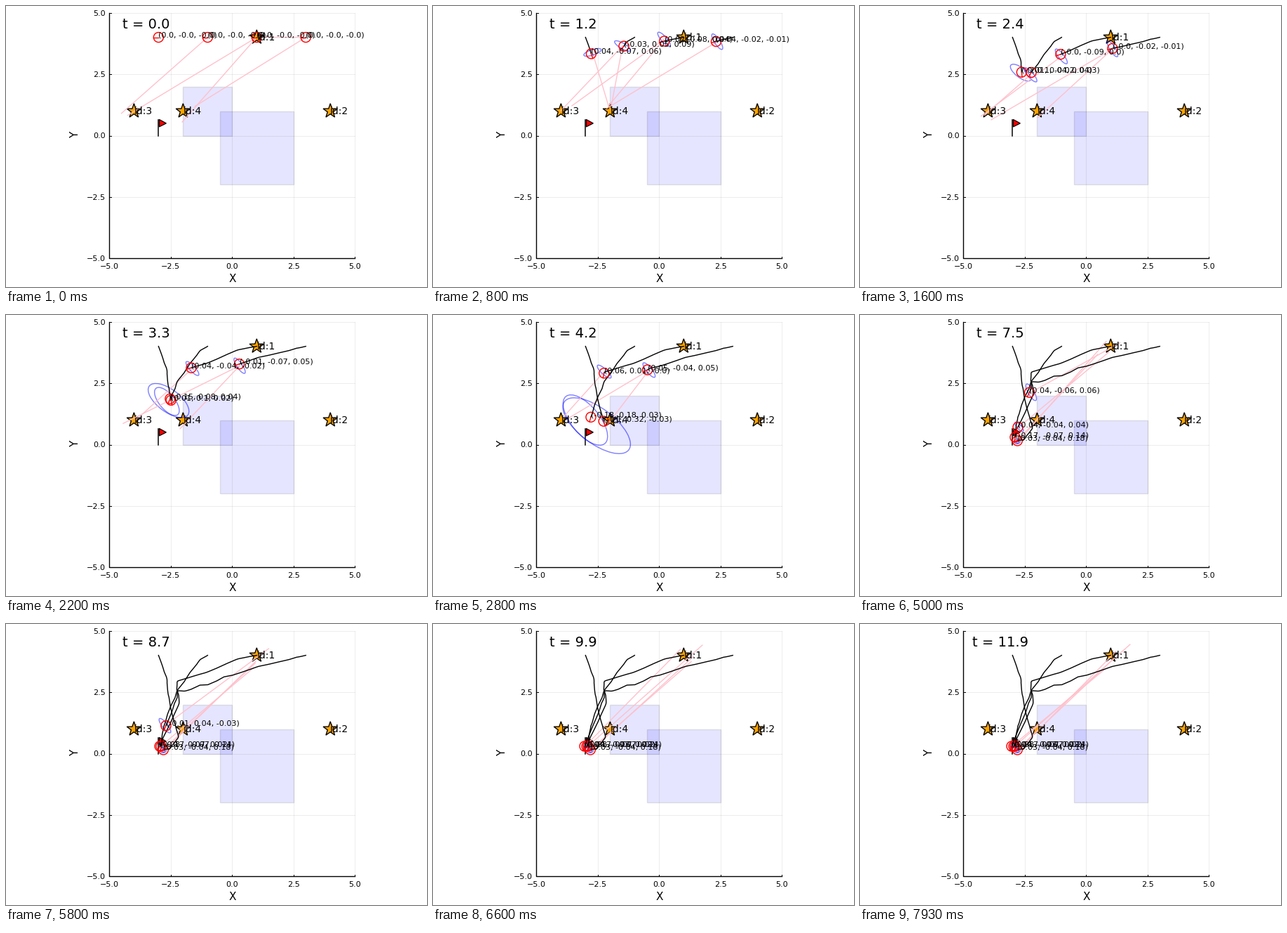
Animation of 600x400 px, one loop 8 s. Source, as a matplotlib script:

```python
import numpy as np
import matplotlib.pyplot as plt
from matplotlib.animation import FuncAnimation
from matplotlib.patches import Circle, Ellipse, Polygon, Rectangle

STEPS = 120
W, H, DPI = 600, 400, 100
UNIT = 34.98
PX = 72 / DPI              # one pixel in points
FOV = np.radians(47)       # half angle of the forward view
REAR = np.radians(130)     # beyond this a star is seen looking back
LOOK_BACK = 45             # step from which robots look back
NEAR, FAR = 2.2 * UNIT, 6.3 * UNIT


def X(x):
    return 322.3 + UNIT * x


def Y(y):
    return 184.5 - UNIT * y


STARS = np.array([(X(x), Y(y)) for x, y in ((1, 4), (4, 1), (-4, 1), (-2, 1))])
GOAL = np.array([X(-3), Y(0)])

# Per robot: key points (step, x, y) and the pose error it ends with
ROBOTS = [
    ([(0, X(-3), Y(4)), (18, 230, 79), (27, 230.5, 101), (42, 243, 152),
      (47, 246, 161), (59, 234, 177), (66, 224.3, 179)], (.03, -.04, .18)),
    ([(0, X(-1), Y(4)), (10, 276, 51.5), (24, 245, 94), (42, 224.5, 146),
      (57, 221, 174)], (-.17, -.07, .14)),
    ([(0, X(1), Y(4)), (12, 330, 49.5), (24, 286, 69), (41, 243.7, 81.2),
      (59, 246.7, 113), (75, 225, 160), (86, 219, 174)], (.08, -.07, .02)),
    ([(0, X(3), Y(4)), (10, 411, 48.3), (24, 360, 60.5), (59, 254, 95.3),
      (65, 244.5, 95), (75, 241.8, 110), (97, 216, 174)], (.04, -.03, .02)),
]

rng = np.random.default_rng(7)


def drive(keys):
    """Positions along the key points with a slight sway, and headings."""
    s, x, y = np.array(keys, float).T
    k = np.arange(STEPS)
    pos = np.stack([np.interp(k, s, x), np.interp(k, s, y)], 1)
    pos[1:-1] = (pos[:-2] + 2 * pos[1:-1] + pos[2:]) / 4
    pos[0] = x[0], y[0]
    envelope = np.sin(np.pi * np.clip(k / s[-1], 0, 1))
    for axis in (0, 1):
        sway = rng.normal(0, .7, STEPS // 4 + 1)
        pos[:, axis] += envelope * np.interp(k, np.arange(len(sway)) * 4, sway)

    turn = [np.pi]
    for i in k[1:]:
        dx, dy = pos[min(i + 1, STEPS - 1)] - pos[i - 1]
        dist = np.hypot(dx, dy)
        if dist < .05 or i >= s[-1]:
            turn.append(turn[-1])
            continue
        mix = min(i / 8, 1)  # all start facing left
        turn.append(np.arctan2(-mix * dy / dist, mix * dx / dist - 1 + mix))
    return pos, np.array(turn), int(s[-1])


def visible(k, pos, turn):
    found = []
    for i, (dx, dy) in enumerate(STARS - pos):
        off = np.arctan2(-dy, dx) - turn
        off = abs((off + np.pi) % (2 * np.pi) - np.pi)
        ahead = off < FOV and np.hypot(dx, dy) < FAR
        behind = i == 0 and k >= LOOK_BACK and off > REAR
        here = k == 0 and np.hypot(dx, dy) > 1 and off < .1
        if here or (ahead or behind) and np.hypot(dx, dy) > NEAR:
            found.append(i)
    return found


def simulate(keys, final):
    """One record per step: place, heading, error, ellipse and sightings."""
    path, turns, end = drive(keys)
    log = []
    a = b = tilt = 0.0
    err = np.zeros(3)
    for k, (pos, turn) in enumerate(zip(path, turns)):
        seen = visible(k, pos, turn)
        if k and seen:
            size = min(13, .3 * np.hypot(*(pos - GOAL)))
            a += (size - a) * .5
            b += (max(.3 * size, 3) - b) * .5
            dx, dy = np.mean([STARS[i] - pos for i in seen], 0)
            tilt = np.degrees(np.arctan2(dy, dx)) + 90
        elif k and k < end:
            a += 1 + .035 * a
            b += 1
        if k >= end:
            err = np.array(final)
        elif k:
            drift = np.array([-.0015, .0072, -.0033]) * max(a - 13, 0)
            err = drift + np.array(final) * k / end + rng.normal(0, .035, 3)

        c, s = np.cos(turn), np.sin(turn)
        guess = pos - UNIT * np.array([c * err[0] - s * err[1],
                                       -s * err[0] - c * err[1]])
        rays = {}
        for i in seen:
            dx, dy = STARS[i] - pos
            far, side = rng.normal(size=2).clip(-1.8, 1.8)
            ang = np.arctan2(dy, dx) + .035 * side
            length = np.hypot(dx, dy) * (1 + .08 * far)
            rays[i] = guess + length * np.array([np.cos(ang), np.sin(ang)])
        values = [round(float(v), 2) for v in err] if k else [0.0, -0.0, -0.0]
        note = '(' + ', '.join(map(str, values)) + ')'
        log.append((pos, turn, note, guess, (a, b, tilt), rays))
    return path, log


runs = [simulate(*robot) for robot in ROBOTS]

plt.rcParams['font.family'] = 'DejaVu Sans'
fig = plt.figure(figsize=(W / DPI, H / DPI), dpi=DPI, facecolor='white')
ax = fig.add_axes([0, 0, 1, 1])
ax.set_xlim(0, W)
ax.set_ylim(H, 0)
ax.axis('off')

L, R, T, B = X(-5), X(5), Y(5), Y(-5)
frame = Rectangle((L, T), R - L, B - T, fc='none', ec='none')
ax.add_patch(frame)


def line(xs, ys, color, width=1.35, z=1, **kw):
    return ax.plot(xs, ys, color=color, lw=width * PX, zorder=z, **kw)[0]


def label(x, y, s, size, ha='left', z=9, va='baseline', **kw):
    return ax.text(x, y, s, size=size, ha=ha, va=va, zorder=z, **kw)


def patch(shape, z):
    shape.set_zorder(z)
    return ax.add_patch(shape)


for v in (-5, -2.5, 0, 2.5, 5):
    line([X(v)] * 2, [T, B], 'black', .7, .5, alpha=.1)
    line([L, R], [Y(v)] * 2, 'black', .7, .5, alpha=.1)
    line([X(v)] * 2, [B, B - 2.5], 'black', 1)
    line([L, L + 2.5], [Y(v)] * 2, 'black', 1)
    name = f'{v:.1f}'.replace('-', '\u2212')
    label(X(v), 374.3, name, 8, 'center')
    label(142, Y(v) + 4, name, 8, 'right')
line([L, L, R], [T, B, B], 'black', 1.4)
label(X(0), 393, 'X', 11, 'center')
label(99, Y(0) - 1, 'Y', 11, 'center', va='center', rotation=90)

for x, y, size in ((-2, 2, 2), (-.5, 1, 3)):
    patch(Rectangle((X(x), Y(y)), size * UNIT, size * UNIT, fc=(0, 0, 1, .1),
                    ec=(0, 0, 0, .1), lw=1.35 * PX), 1)

gx, gy = GOAL
line([gx, gx], [gy, gy - 22.5], 'black', 1.5, 3)
patch(Polygon([(gx + 1, gy - 23), (gx + 11, gy - 17.5), (gx + 1, gy - 12.5)],
              fc='red', ec='black', lw=1.2 * PX), 3)

for i, (x, y) in enumerate(STARS):
    tips = [(x + q * np.sin(j * np.pi / 5), y - q * np.cos(j * np.pi / 5))
            for j, q in enumerate([10.7, 4.2] * 5)]
    patch(Polygon(tips, fc='orange', ec='black', lw=1.35 * PX), 3)
    label(x, y + 4.3, f'id:{i + 1}', 10, z=6)

clock = label(X(-3.5), 32.3, '', 14, 'center')


class Robot:
    def __init__(self, path, log):
        self.path, self.log = path, log
        self.rays = [line([], [], 'pink', 1.35, 4) for _ in STARS]
        self.trail = line([], [], 'black', 1.4, 5)
        self.nose = line([], [], 'red', 1.4, 5)
        self.body = patch(Circle((0, 0), 7, fc='none', ec='red',
                                 lw=1.4 * PX), 5)
        self.oval = patch(Ellipse((0, 0), 1, 1, fc='none', ec=(0, 0, 1, .5),
                                  lw=1.4 * PX), 4)
        self.note = label(0, 0, '', 8)
        for art in self.rays + [self.oval]:
            art.set_clip_path(frame)

    def show(self, k):
        (x, y), turn, note, guess, (a, b, tilt), seen = self.log[k]
        self.trail.set_data(*self.path[:k + 1].T)
        self.body.center = x, y
        self.nose.set_data([x, x + 7 * np.cos(turn)], [y, y - 7 * np.sin(turn)])
        self.oval.set(center=guess, width=2 * a, height=2 * b, angle=tilt,
                      visible=a > 0)
        self.note.set_text(note)
        self.note.set_position((x, y))
        for i, ray in enumerate(self.rays):
            end = seen.get(i, guess)
            ray.set_visible(i in seen)
            ray.set_data([guess[0], end[0]], [guess[1], end[1]])


robots = [Robot(*run) for run in runs]


def draw(i):
    k = min((i + 1) // 2, STEPS - 1)
    clock.set_text(f't = {k / 10:.1f}')
    for robot in robots:
        robot.show(k)
    return []


FRAMES = 2 * STEPS
anim = FuncAnimation(fig, draw, frames=FRAMES, interval=8000 / FRAMES,
                     repeat=True, repeat_delay=0, init_func=lambda: draw(0))
plt.show()
```
